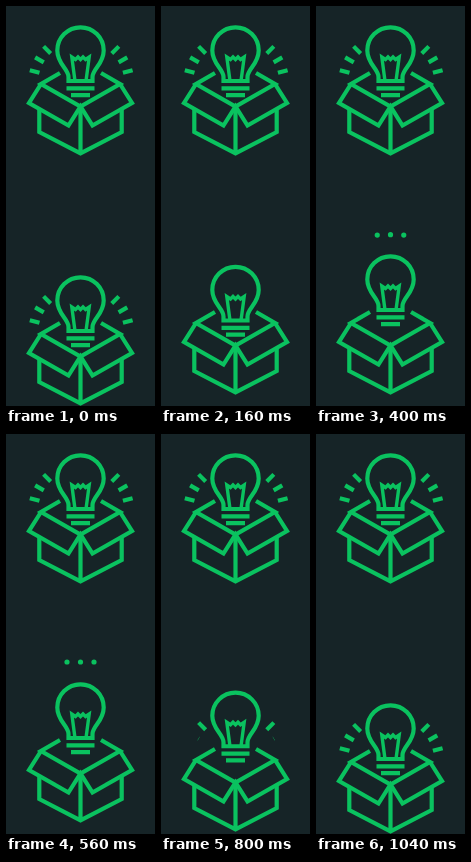
An HTML page that plays this animation: 149x400 px, repeating every 1.52 s.

```html
<!DOCTYPE html>
<html lang="en">
<head>
<meta charset="utf-8">
<title>Idea box</title>
<style>
  html, body { margin: 0; width: 100%; height: 100%; overflow: hidden; background: #162427; }
  svg { display: block; width: 149px; height: 400px; }
  .icon { fill: none; stroke: #0ac25f; stroke-width: 4.2; }
  .front { fill: #162427; stroke: none; }
  .dots { fill: #0ac25f; }
</style>
</head>
<body>
<svg viewBox="0 0 149 400">
  <defs>
    <g id="bulb">
      <path d="M62.5 75V71C62.5 63 51.3 58 51.3 44.5A23.2 23.2 0 0 1 97.7 44.5C97.7 58 86.5 63 86.5 71V75Z"/>
      <path stroke-width="3.4" d="M69 75L65.8 51L69.5 53.5L72 51L74.5 53.5L77 51L79.5 53.5L83.2 51L80 75"/>
      <path d="M60.5 82.3H88.5M65 89.2H84"/>
    </g>
    <g id="box">
      <path class="front" d="M35 78L23 97L33.3 103V126L74.5 147.3L115.7 126V103L126 97L114 78L74.5 100.5Z"/>
      <path d="M54 67L35 78L74.5 100.5L114 78L95 67"/>
      <path d="M35 78L23 97L62.5 119.5L74.5 100.5L86.5 119.5L126 97L114 78"/>
      <path d="M33.3 103V126L74.5 147.3L115.7 126V103M74.5 100.5V147"/>
    </g>
  </defs>
  <g class="icon">
    <path id="stillRays"/>
    <use href="#bulb"/>
    <use href="#box"/>
  </g>
  <g class="icon" transform="translate(0 250)">
    <path id="rays"/>
    <use href="#bulb" id="liveBulb"/>
    <use href="#box" id="liveBox"/>
  </g>
  <g class="dots" id="dots"><circle/><circle/><circle/></g>
</svg>
<script>
const LOOP = 1520, STEP = 40, MID = 74.5;
const byId = id => document.getElementById(id);
const shift = (el, y) => el.setAttribute("transform", `translate(0 ${y})`);

const progress = (t, from, to) => Math.min(1, Math.max(0, (t - from) / (to - from)));
const smooth = (t, from, to) => {
  const u = progress(t, from, to);
  return u * u * (3 - 2 * u);
};
const easeOut = (t, from, to) => 1 - (1 - progress(t, from, to)) ** 4;

// Rays fan out from one centre, 15 degrees apart, mirrored left and right.
function rayPath(lengthOf) {
  const cx = 75.2, cy = 78, inner = 43.2;
  let d = "";
  for (let i = 0; i < 3; i++) {
    const length = 10 * lengthOf(i);
    if (length <= 0) continue;
    const angle = (45 - 15 * i) * Math.PI / 180;
    for (const side of [-1, 1]) {
      const point = r => `${cx + side * r * Math.cos(angle)} ${cy - r * Math.sin(angle)}`;
      d += `M${point(inner)}L${point(inner + length)}`;
    }
  }
  return d;
}

// The lowest rays leave first and return last.
const rayLength = (i, t) =>
  1 - smooth(t, 120 - 40 * i, 160 - 40 * i) + smooth(t, 700 + 90 * i, 790 + 90 * i);

function drawDots(t) {
  const rise = easeOut(t, 160, 560), fall = smooth(t, 600, 820);
  const height = rise - fall;
  const size = smooth(t, 160, 240) - smooth(t, 720, 800);
  [...byId("dots").children].forEach((dot, i) => {
    const side = i - 1;
    const drop = side ? 17 * (1 - rise) + 5 * fall : 0;
    dot.setAttribute("cx", MID + side * (4 + 9.5 * height));
    dot.setAttribute("cy", 254 - 26 * height + drop);
    dot.setAttribute("r", 2.6 * size);
  });
}

function draw(t) {
  const boxY = -11 * (smooth(t, 0, 80) - smooth(t, 640, 860));
  const bulbY = -21 * (smooth(t, 80, 240) - smooth(t, 680, 960));
  shift(byId("liveBox"), boxY);
  shift(byId("liveBulb"), bulbY);
  shift(byId("rays"), boxY * 0.87);
  byId("rays").setAttribute("d", rayPath(i => rayLength(i, t)));
  drawDots(t);
}

const start = performance.now();
function tick() {
  const t = (performance.now() - start) % LOOP;
  draw(Math.floor(t / STEP) * STEP);
  requestAnimationFrame(tick);
}

byId("stillRays").setAttribute("d", rayPath(() => 1));
tick();
</script>
</body>
</html>
```
